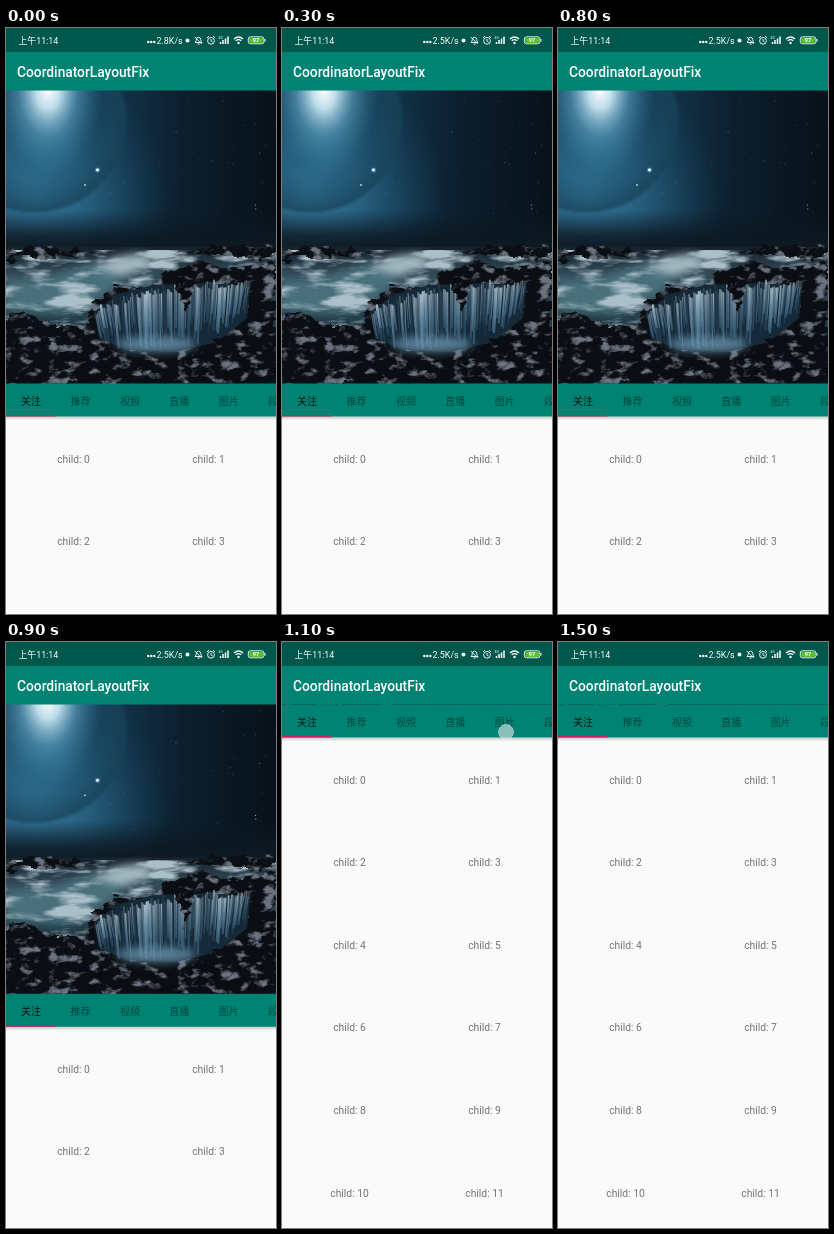
Write an HTML page that moves like this. It is 270 px wide and 586 px high and loops after 1800 ms.

```html
<!DOCTYPE html>
<html lang="zh">
<head>
<meta charset="utf-8">
<style>
  html, body { margin: 0; height: 100%; overflow: hidden; background: #fafafa; }
  svg { display: block; width: 100vw; height: 100vh; }
  text { font-family: Roboto, "Noto Sans CJK SC", "Noto Sans CJK", sans-serif; }
  filter { color-interpolation-filters: sRGB; }
  #list { font-size: 10.3px; fill: #747474; text-anchor: middle; }
  #tabs { font-size: 10px; fill: #000; text-anchor: middle; }
</style>
</head>
<body>
<svg viewBox="0 0 270 586">
  <defs>
    <linearGradient id="sky">
      <stop offset="0" stop-color="#163e54"/><stop offset=".4" stop-color="#12344a"/>
      <stop offset=".65" stop-color="#0c1f2e"/><stop offset="1" stop-color="#08111a"/>
    </linearGradient>
    <radialGradient id="halo" gradientUnits="userSpaceOnUse" cx="30" cy="170" r="135">
      <stop offset="0" stop-color="#35799d"/><stop offset=".4" stop-color="#296484" stop-opacity=".85"/>
      <stop offset="1" stop-color="#16405a" stop-opacity="0"/>
    </radialGradient>
    <radialGradient id="planet" gradientUnits="userSpaceOnUse" cx="28" cy="92" r="95">
      <stop offset=".55" stop-color="#1d5371" stop-opacity=".2"/>
      <stop offset=".95" stop-color="#184258" stop-opacity=".75"/><stop offset="1" stop-color="#184258" stop-opacity="0"/>
    </radialGradient>
    <radialGradient id="glow">
      <stop offset="0" stop-color="#fff"/><stop offset=".22" stop-color="#cdeaf5" stop-opacity=".92"/>
      <stop offset=".55" stop-color="#67aecf" stop-opacity=".5"/><stop offset="1" stop-color="#3a8bb0" stop-opacity="0"/>
    </radialGradient>
    <linearGradient id="dusk" x2="0" y2="1">
      <stop offset="0" stop-color="#0c1822" stop-opacity="0"/><stop offset=".65" stop-color="#0c1822" stop-opacity=".8"/>
      <stop offset="1" stop-color="#0e1a24"/>
    </linearGradient>
    <linearGradient id="sea" x2="0" y2="1">
      <stop offset="0" stop-color="#15212b"/><stop offset=".2" stop-color="#334b59"/>
      <stop offset=".5" stop-color="#24404b"/><stop offset="1" stop-color="#0a1016"/>
    </linearGradient>
    <linearGradient id="fall" x2="0" y2="1">
      <stop offset="0" stop-color="#c3d7e2"/><stop offset=".4" stop-color="#83a8c0"/><stop offset="1" stop-color="#3e6a86"/>
    </linearGradient>
    <linearGradient id="shade" x2="0" y2="1">
      <stop offset="0" stop-opacity=".2"/><stop offset="1" stop-opacity="0"/>
    </linearGradient>
    <filter id="soft" x="-30%" y="-60%" width="160%" height="220%"><feGaussianBlur stdDeviation="4"/></filter>
    <filter id="haze"><feGaussianBlur stdDeviation=".5"/></filter>
    <filter id="spray">
      <feTurbulence type="fractalNoise" baseFrequency=".022 .085" numOctaves="4" seed="4"/>
      <feColorMatrix values="0 0 0 0 .67  0 0 0 0 .75  0 0 0 0 .79  4.5 0 0 0 -2.1"/>
      <feComposite in2="SourceGraphic" operator="in"/>
    </filter>
    <filter id="rock" x="-5%" y="-10%" width="110%" height="120%">
      <feTurbulence type="fractalNoise" baseFrequency=".07 .12" numOctaves="4" seed="9" result="noise"/>
      <feDisplacementMap in="SourceGraphic" in2="noise" scale="16" xChannelSelector="G" yChannelSelector="B" result="jagged"/>
      <feColorMatrix in="noise" values="0 0 0 0 .42  0 0 0 0 .45  0 0 0 0 .5  5 0 0 0 -2.65"/>
      <feComposite in2="jagged" operator="atop"/>
    </filter>
    <clipPath id="frame"><path d="M0 62h270v294H0z"/></clipPath>
  </defs>

  <rect width="270" height="586" fill="#fafafa"/>
  <g id="page">
    <g clip-path="url(#frame)">
      <rect y="62" width="270" height="160" fill="url(#sky)"/>
      <circle cx="30" cy="170" r="135" fill="url(#halo)"/>
      <circle cx="28" cy="92" r="95" fill="url(#planet)"/>
      <ellipse cx="42" cy="62" rx="55" ry="85" fill="url(#glow)"/>
      <rect y="182" width="270" height="40" fill="url(#dusk)"/>
      <g id="stars" fill="#b5d4e4"></g>
      <circle cx="91.5" cy="142" r="2.6" fill="#7fc4e6" opacity=".4"/>
      <circle cx="91.5" cy="142" r="1.4" fill="#f4fcff"/>
      <circle cx="79" cy="157" r=".9" fill="#b8dcec"/>

      <rect y="219" width="270" height="137" fill="url(#sea)"/>
      <g filter="url(#soft)">
        <path d="M0 252q45 0 65-10t60-8l-20 30-45 22-60-4z" fill="#48707b"/>
        <path d="M88 240q20-14 50-14l15 8-35 14z" fill="#a3b9c1"/>
      </g>
      <path d="M0 222h270v30H150l-60 50H0z" filter="url(#spray)"/>
      <g fill="#0b0f14" filter="url(#rock)">
        <path d="M0 222l40-2 50 4-30 5-60 3z"/>
        <path d="M170 224l50-6 50 2v12l-55-3z"/>
        <path d="M140 262l18-16 24-8 14-5 24 7 50-4v120H0v-72l28 4 22 10 30-4 6-22 26-14z"/>
      </g>
      <path d="M88 284l24-18 36-9 50-2 46 3-3 32-30 24-42 10-48-2-28-12z" fill="#152938" filter="url(#haze)"/>
      <g id="water" fill="none" stroke="url(#fall)" stroke-linecap="round" filter="url(#haze)"></g>
      <ellipse cx="150" cy="316" rx="40" ry="8" fill="#6f9ab4" opacity=".75" filter="url(#soft)"/>
      <g fill="#0a0d12" filter="url(#rock)">
        <path d="M165 250l16-5 10 8-6 16-5 22-5-20z"/>
        <path d="M72 318l24 4 24 7 34 4 30-4 20-12 28-10 38-18v68H60z"/>
      </g>
    </g>
    <g id="tabs">
      <rect y="388.5" width="270" height="4" fill="url(#shade)"/>
      <rect y="355.5" width="270" height="33" fill="#008373"/>
      <rect y="387" width="49.5" height="1.5" fill="#d81b60"/>
    </g>
    <g id="list"></g>
  </g>

  <rect y="24" width="270" height="38.5" fill="#008373"/>
  <rect width="270" height="24" fill="#00574b"/>
  <text x="11" y="49" font-size="13.75" font-weight="500" fill="#fff">CoordinatorLayoutFix</text>
  <g fill="#fff" font-size="8.9">
    <text x="12.5" y="16">上午11:14</text>
    <circle cx="142.3" cy="14" r="1.2"/><circle cx="145.3" cy="14" r="1.2"/><circle cx="148.3" cy="14" r="1.2"/>
    <text id="speed" x="150.5" y="16"></text>
    <circle cx="181.5" cy="12.5" r="2"/>
    <g fill="none" stroke="#fff" stroke-width=".9">
      <path d="M189 14.5q1.3-1 1.3-3a2.2 2.2 0 0 1 4.4 0q0 2 1.3 3zM191.5 16h2.2M188.8 9l7 7"/>
      <circle cx="205" cy="12.8" r="3.4"/><path d="M205 10.8v2.3l1.5.8M201 10l2-2M209 10l-2-2"/>
      <path d="M228 11q4.5-4 9 0M229.7 12.9q2.8-2.5 5.6 0" stroke-width="1.2"/>
      <path d="M214.5 16v-2M217 16v-4M219.5 16v-5.5M222 16V8.5" stroke-width="1.5"/>
      <rect x="242.3" y="8.8" width="15.6" height="7" rx="2.2"/>
    </g>
    <circle cx="232.5" cy="15" r="1.2"/>
    <text x="212.5" y="11" font-size="3.5">4G</text>
    <rect x="243.2" y="9.7" width="13.8" height="5.2" rx="1.4" fill="#55c52c"/>
    <rect x="258.5" y="11" width="1" height="2.6"/>
    <text x="250" y="14.4" font-size="5.6" font-weight="700" text-anchor="middle">97</text>
  </g>
  <circle id="touch" cx="224" cy="90" r="7.5" fill="#d3dddf" fill-opacity=".65" stroke="#e8eeee" stroke-opacity=".5"/>
</svg>
<script>
const el = id => document.getElementById(id);
const add = (id, markup) => el(id).insertAdjacentHTML('beforeend', markup);
const repeat = (n, make) => Array.from({ length: n }, (_, i) => make(i)).join('');

let seed = 7;
const rand = (lo, hi) => {
  seed = (seed * 16807) % 2147483647;
  return lo + (hi - lo) * seed / 2147483647;
};

add('stars', repeat(38, () =>
  `<circle cx="${rand(95, 270)}" cy="${rand(66, 195)}" r="${rand(.25, .6)}" opacity="${rand(.3, .8)}"/>`));

// Streams follow the curved rim of the hole
add('water', repeat(95, i => {
  const u = i / 94, x = 90 + u * 154, arch = Math.sin(u * Math.PI);
  const top = 256 + 26 * (1 - u) ** 3 + rand(-4, 6);
  const drop = 22 + arch * 25 + rand(-10, 12);
  const lean = (.5 - u) * 8;
  return `<path d="M${x} ${top}q${lean * .2} ${drop * .4} ${lean} ${drop}" stroke-width="${rand(.6, 2.6)}" opacity="${rand(.1, .8)}"/>`;
}));

add('tabs', ['关注', '推荐', '视频', '直播', '图片', '段子'].map((name, i) =>
  `<text x="${25 + i * 49.45}" y="376.7" opacity="${i ? .46 : .87}">${name}</text>`).join(''));

add('list', repeat(12, i =>
  `<text x="${i % 2 ? 202.5 : 67.5}" y="${434.5 + (i >> 1) * 82.6}">child: ${i}</text>`));

// The screen refreshes in 100 ms steps
const scrollAt = step => step < 9 ? 0 : step === 9 ? 3.7 : step === 10 ? 125 : 293;

function draw(now) {
  const step = Math.floor(now % 1800 / 100);
  el('page').setAttribute('transform', `translate(0 ${-scrollAt(step)})`);
  el('speed').textContent = step < 2 ? '2.8K/s' : '2.5K/s';
  el('touch').style.display = step === 10 || step === 11 ? '' : 'none';
  requestAnimationFrame(draw);
}
draw(performance.now());
</script>
</body>
</html>
```
